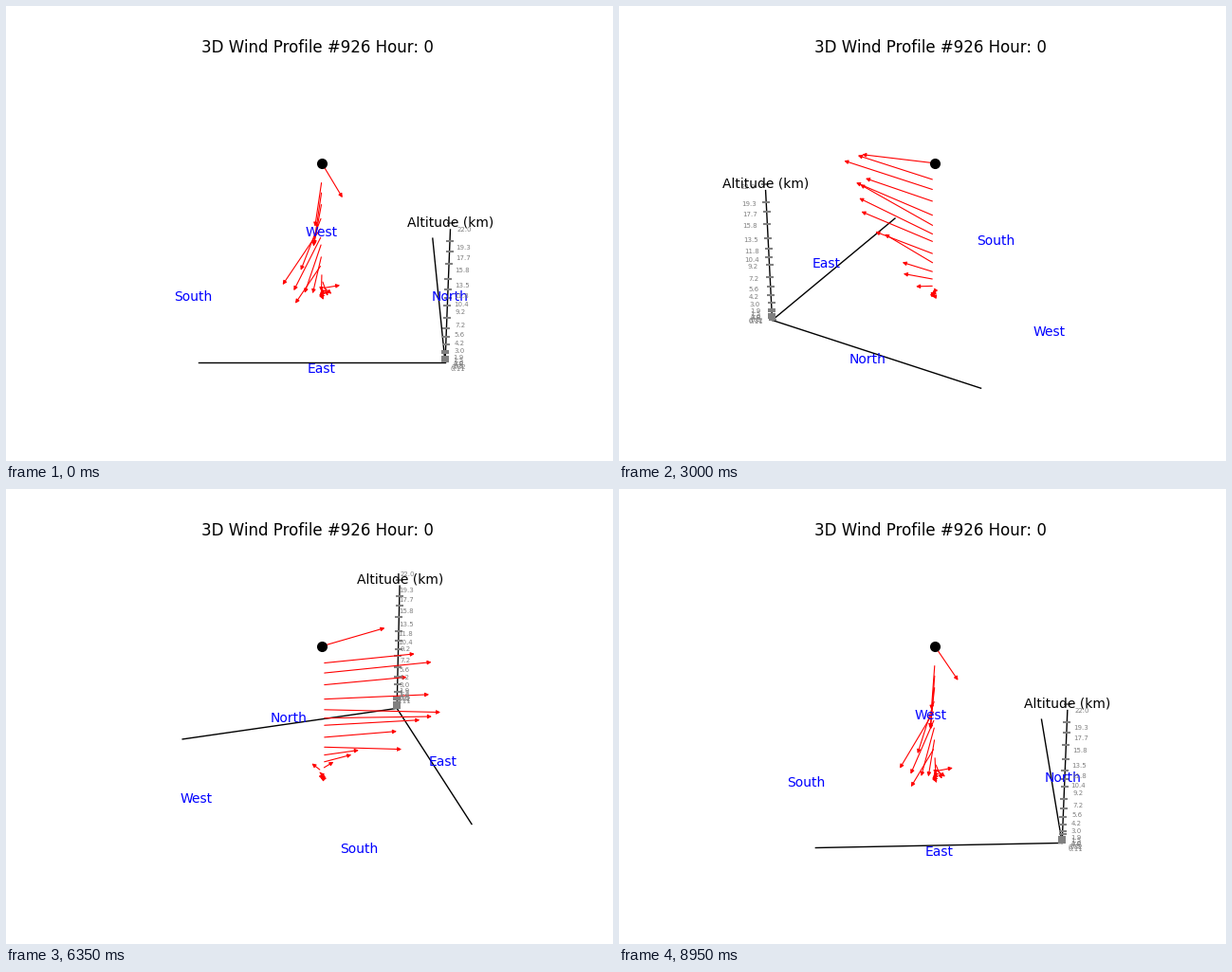
A matplotlib script that plays this animation: 640x480 px, repeating every 9 s.

```python
import numpy as np
import matplotlib.pyplot as plt
from matplotlib.animation import FuncAnimation
from matplotlib.patches import FancyArrowPatch

W, H = 640, 480
FRAMES, INTERVAL = 180, 50

# Perspective camera: 30 degrees up, turning around the vertical axis
CX, CY, SCALE, DIST = 333.0, 237.4, 199.8, 10
ELEV = np.radians(30)

# Scene layout in world units
EDGE, OUTER = 0.6286, 0.6914
FLOOR, KM = -0.411, 0.0371
LINE_TOP, LABEL_TOP = 21.07, 22.1

# altitude in km, wind towards east, wind towards north
WINDS = [
    (0.11, 0.030, 0.008), (0.32, 0.026, 0.010), (0.5, 0.020, 0.014),
    (0.8, 0.012, 0.018), (1.0, -0.005, 0.022), (1.5, -0.036, 0.112),
    (1.9, 0.097, 0.063), (3.0, 0.191, 0.036), (4.2, 0.220, -0.003),
    (5.6, 0.415, -0.144), (7.2, 0.417, -0.050), (9.2, 0.531, -0.091),
    (10.4, 0.578, -0.147), (11.8, 0.605, -0.203), (13.5, 0.572, -0.110),
    (15.8, 0.468, -0.042), (17.7, 0.603, -0.043), (19.3, 0.510, -0.036),
    (22.0, 0.391, 0.110),
]
COMPASS = {"East": (OUTER, 0), "West": (-OUTER, 0),
           "North": (0, OUTER), "South": (0, -OUTER)}


def project(x, y, km, azim):
    """Pixel position of a point at the given altitude."""
    z = FLOOR + KM * km
    right = -x * np.sin(azim) + y * np.cos(azim)
    near = x * np.cos(azim) + y * np.sin(azim)
    up = z * np.cos(ELEV) - near * np.sin(ELEV)
    depth = 1 - (near * np.cos(ELEV) + z * np.sin(ELEV)) / DIST
    return CX + SCALE * right / depth, CY - SCALE * up / depth


fig = plt.figure(figsize=(W / 100, H / 100), dpi=100, facecolor="white")
ax = fig.add_axes([0, 0, 1, 1])
ax.set_xlim(0, W)
ax.set_ylim(H, 0)
ax.axis("off")


def label(text, size, color, z):
    return ax.text(0, 0, text, size=size, color=color, zorder=z,
                   ha="center", va="center")


ax.text(328, 49.27, "3D Wind Profile #926 Hour: 0", size=12, ha="center")

AXES = [((-EDGE, EDGE, 0), (EDGE, EDGE, 0)),
        ((EDGE, -EDGE, 0), (EDGE, EDGE, 0)),
        ((EDGE, EDGE, 0), (EDGE, EDGE, LINE_TOP))]
lines = [ax.plot([], [], color="black", lw=1, zorder=2)[0] for _ in AXES]
ticks, = ax.plot([], [], "_", color="gray", ms=6, mew=1.5, zorder=3)
arrows = []
for _ in WINDS:
    arrow = FancyArrowPatch((0, 0), (1, 1), arrowstyle="-|>", color="red",
                            mutation_scale=6, lw=0.8, zorder=4)
    arrows.append(ax.add_patch(arrow))
dot, = ax.plot([], [], "o", color="black", ms=8, mew=0, zorder=5)

names = {name: label(name, 10, "blue", 6) for name in COMPASS}
heights = [label(str(km), 5, "gray", 6) for km, _, _ in WINDS]
title = label("Altitude (km)", 10, "black", 6)


def update(i):
    azim = np.radians(360 * i / FRAMES)
    for line, (start, end) in zip(lines, AXES):
        line.set_data(*zip(project(*start, azim), project(*end, azim)))
    for arrow, text, (km, east, north) in zip(arrows, heights, WINDS):
        arrow.set_positions(project(0, 0, km, azim),
                            project(east, north, km, azim))
        text.set_position(project(OUTER, OUTER, km, azim))
    for name, (x, y) in COMPASS.items():
        names[name].set_position(project(x, y, 0, azim))
    levels = np.array([w[0] for w in WINDS])
    ticks.set_data(*project(EDGE, EDGE, levels, azim))
    title.set_position(project(EDGE, EDGE, LABEL_TOP, azim))
    x, y = project(0, 0, levels[-1], azim)
    dot.set_data([x], [y])
    return [*lines, ticks, *arrows, dot, *names.values(), *heights, title]


anim = FuncAnimation(fig, update, frames=FRAMES, interval=INTERVAL,
                     repeat=True, repeat_delay=0)
plt.show()
```
